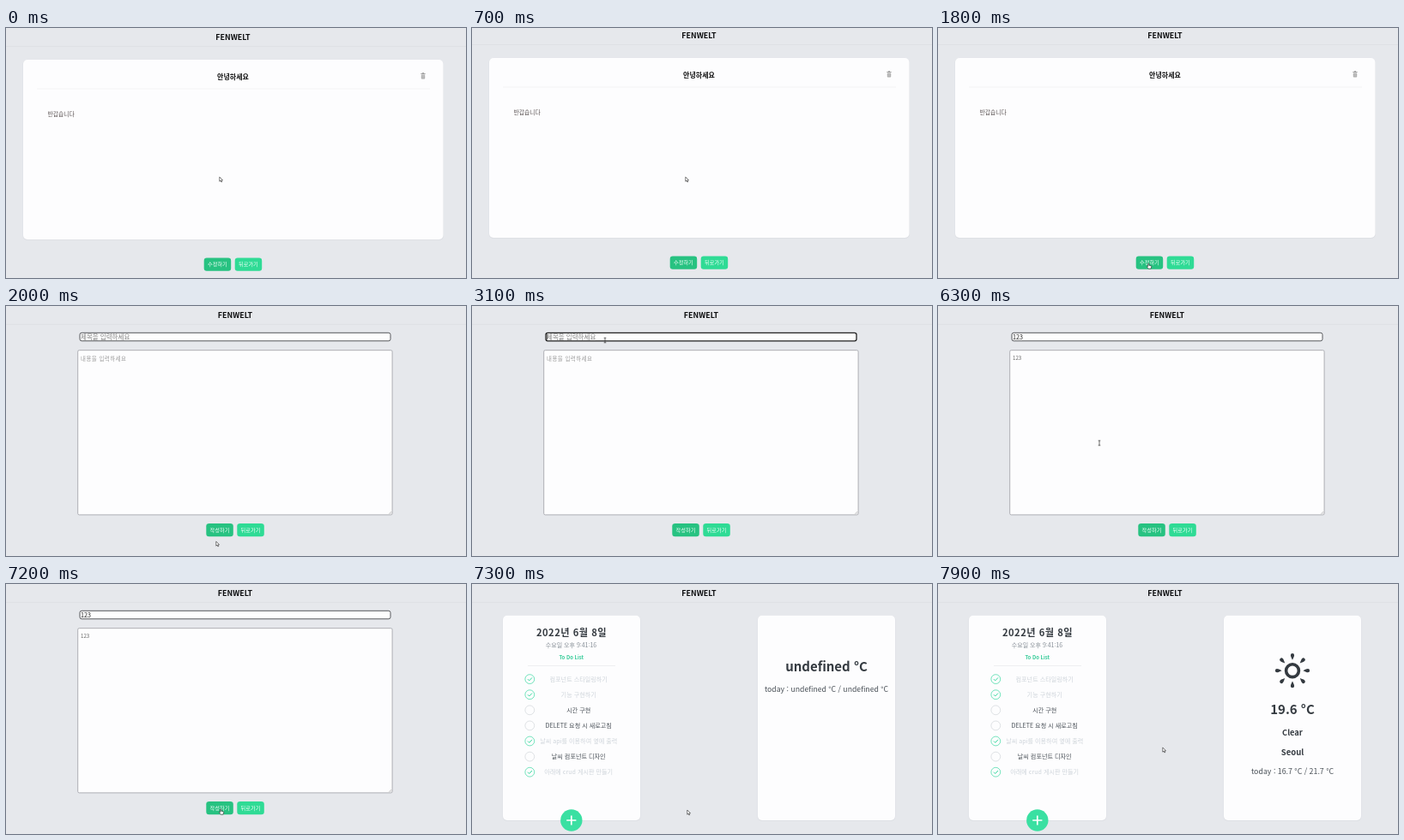
These frames come from a looping animation (536 px wide and 292 px high, 8000 ms). An HTML page:

```html
<!DOCTYPE html>
<html lang="ko">
<head>
<meta charset="utf-8">
<style>
html, body { margin: 0; width: 100%; height: 100%; overflow: hidden; background: #e6e8ec; }
svg { display: block; width: 536px; height: 292px; font-family: "Noto Sans CJK KR", "Noto Sans", sans-serif; }
</style>
</head>
<body>
<svg id="stage" viewBox="0 0 536 292"></svg>
<script>
const LOOP = 8000;
const stage = document.getElementById('stage');

function add(parent, tag, attrs = {}) {
  const el = document.createElementNS('http://www.w3.org/2000/svg', tag);
  for (const key in attrs) el.setAttribute(key, attrs[key]);
  return parent.appendChild(el);
}
const group = parent => add(parent, 'g');
const show = (el, on) => el.setAttribute('visibility', on ? 'inherit' : 'hidden');

// y is the vertical middle of the glyphs
function label(parent, text, x, y, size, fill, attrs = {}) {
  const el = add(parent, 'text', {
    x, y: y + size * 0.36, 'font-size': size, fill, 'text-anchor': 'middle', ...attrs
  });
  el.textContent = text;
  return el;
}
const bold = { 'font-weight': 700 };
const left = { 'text-anchor': 'start' };

function box(parent, x, y, width, height, rx, fill, attrs = {}) {
  return add(parent, 'rect', { x, y, width, height, rx, fill, ...attrs });
}
function path(parent, d, attrs) {
  return add(parent, 'path', { d, fill: 'none', ...attrs });
}
function header(parent, x) {
  label(parent, 'FENWELT', x, 11, 8.9, '#0c0d0f', bold);
  box(parent, 0, 21, 536, 1, 0, '#dfe1e5');
}
function card(parent, x, y, w, h) {
  box(parent, x - 0.5, y - 0.2, w + 1, h + 1.2, 5.5, '#dee0e5');
  box(parent, x, y, w, h, 5, '#fdfdfe');
}
function buttons(parent, x, y, first) {
  [[first, '#27c281'], ['뒤로가기', '#2fdb95']].forEach(([text, fill], i) => {
    box(parent, x + i * 36, y, 31.5, 15.3, 3.2, fill);
    label(parent, text, x + i * 36 + 15.7, y + 7.7, 6.2, '#f4fffa');
  });
}

// Post page
const post = group(stage);
header(post, 264.5);
card(post, 20, 37, 489.5, 210);
label(post, '안녕하세요', 264.5, 57, 8, '#111', bold);
box(post, 36, 70.5, 458, 1, 0, '#f3f3f5');
label(post, '반갑습니다', 48.5, 101, 6.8, '#5a5252', left);
path(post, 'M483.3 53.5h5.4M485 52.6h2', { stroke: '#999', 'stroke-width': 0.9 });
box(post, 483.8, 54.4, 4.4, 5, 0.7, '#aaa');
path(post, 'M485.2 55.2v3.4M486.8 55.2v3.4', { stroke: '#e4e4e4', 'stroke-width': 0.5 });
buttons(post, 230.7, 268.5, '수정하기');

// Edit page
const edit = group(stage);
header(edit, 267);
const titleBox = box(edit, 86, 31.3, 362, 9.5, 2.2, '#fefefe');
const titleHint = label(edit, '제목을 입력하세요', 87, 36, 7.5, '#808080', left);
const titleText = label(edit, '', 87, 36, 7.2, '#222', left);
const caret = box(edit, 0, 32.5, 0.7, 7, 0, '#222');
box(edit, 83.7, 51.7, 366.4, 192.2, 1.6, '#fdfdfe', { stroke: '#a6a8ad', 'stroke-width': 0.9 });
path(edit, 'M446.4 242.8l2.7-2.7M448 242.8l1.1-1.1', { stroke: '#888', 'stroke-width': 0.5 });
const bodyHint = label(edit, '내용을 입력하세요', 87, 61.2, 6.4, '#999', { ...left, 'letter-spacing': 0.5 });
const bodyText = label(edit, '', 87, 61.2, 6.2, '#666', left);
buttons(edit, 233.3, 254, '작성하기');

// Home page
const home = group(stage);
header(home, 264.5);
card(home, 36, 36.8, 160, 239.2);
card(home, 333, 36.8, 160, 239.2);
label(home, '2022년 6월 8일', 116, 57, 11.2, '#343a40', { ...bold, 'letter-spacing': 0.5 });
label(home, '수요일 오후 9:41:16', 115.5, 71.5, 7, '#868e96');
label(home, 'To Do List', 115.7, 86, 5.9, '#35cb98', bold);
box(home, 65, 95, 102, 1, 0, '#eeeff1');
[
  ['컴포넌트 스타일링하기', 1],
  ['기능 구현하기', 1],
  ['시간 구현', 0],
  ['DELETE 요청 시 새로고침', 0],
  ['날씨 api를 이용하여 옆에 출력', 1],
  ['날씨 컴포넌트 디자인', 0],
  ['아래에 crud 게시판 만들기', 1]
].forEach(([text, done], i) => {
  const y = 111.1 + i * 18.1;
  add(home, 'circle', {
    cx: 67.3, cy: y, r: 5.4, fill: 'none',
    stroke: done ? '#4fdcab' : '#d6dade', 'stroke-width': 0.8
  });
  if (done) path(home, `M64.9 ${y}l1.8 1.8 3.3-3.5`, { stroke: '#38d9a0', 'stroke-width': 1 });
  label(home, text, 124.2, y, 7.1, done ? '#ced4da' : '#495057');
});
add(home, 'circle', { cx: 115.8, cy: 276, r: 12.7, fill: '#3ae0a2' });
path(home, 'M110.2 276h11.2M115.8 270.4v11.2', { stroke: '#fff', 'stroke-width': 1.7 });

const loading = group(home);
label(loading, 'undefined °C', 413, 97, 15, '#343a40', bold);
label(loading, 'today : undefined °C / undefined °C', 413, 122.5, 8.7, '#495057');

const weather = group(home);
add(weather, 'circle', { cx: 413, cy: 101.2, r: 7.4, fill: 'none', stroke: '#343a40', 'stroke-width': 3.6 });
for (let a = 0; a < 360; a += 45) {
  path(weather, 'M413 88.8C411.8 86.2 410.9 84.4 410.9 83.2A2.1 2.1 0 0 1 415.1 83.2C415.1 84.4 414.2 86.2 413 88.8Z',
    { fill: '#343a40', transform: `rotate(${a} 413 101.2)` });
}
label(weather, '19.6 °C', 413, 147, 15, '#343a40', bold);
label(weather, 'Clear', 413, 173.5, 9.3, '#343a40', bold);
label(weather, 'Seoul', 413, 197, 9.5, '#343a40', bold);
label(weather, 'today : 16.7 °C / 21.7 °C', 413, 219.3, 8.8, '#495057');

// Pointer shapes, centred on the origin
const pointer = group(stage);
const outline = { stroke: '#222', 'stroke-width': 0.6, fill: '#fff', 'stroke-linejoin': 'round' };
const arrow = path(pointer, 'M-1.2-3V2.2L0 1.1 .9 3 1.7 2.6 .9.8 2.5.7Z', outline);
const hand = path(pointer, 'M-1.2.4V-2.8Q-.7-3.5-.2-2.8V-.8L2.3-.2Q2.8 0 2.7.9L2.1 3.2H-.8L-2.7.7Q-2.4-.2-1.2.4Z', outline);
const beam = path(pointer, 'M-1.3-2.8H1.3M-1.3 2.8H1.3M0-2.8V2.8', { stroke: '#444', 'stroke-width': 0.8 });

// time, x, y
const route = [
  [0, 250, 177], [1000, 250, 177], [1600, 246, 278], [2100, 246, 278], [2900, 155, 40],
  [4500, 155, 40], [5000, 150, 78], [5300, 152, 84], [5600, 152, 84], [6300, 188, 160],
  [6900, 250, 265], [7200, 251, 266], [7300, 252, 267], [7800, 263, 194], [LOOP, 263, 194]
];
function pointerAt(t) {
  const i = route.findIndex(p => p[0] > t);
  const [t0, x0, y0] = route[i - 1], [t1, x1, y1] = route[i];
  const k = (t - t0) / (t1 - t0), e = k * k * (3 - 2 * k);
  return [x0 + (x1 - x0) * e, y0 + (y1 - y0) * e];
}
const typed = (t, start, gap) => '123'.slice(0, Math.max(0, Math.floor((t - start) / gap) + 1));

function draw(t) {
  const page = t < 2000 ? post : t < 7300 ? edit : home;
  for (const p of [post, edit, home]) show(p, p === page);
  post.setAttribute('transform', `translate(0 ${t < 500 ? 0 : -2})`);

  const title = typed(t, 4000, 200), body = typed(t, 5700, 150);
  const focused = t >= 3000 && t < 5300;
  titleText.textContent = title;
  bodyText.textContent = body;
  show(titleHint, page === edit && !title);
  show(bodyHint, page === edit && !body);
  titleBox.setAttribute('stroke', focused ? '#222' : '#55575b');
  titleBox.setAttribute('stroke-width', focused ? 1.3 : 1);
  caret.setAttribute('x', 87.2 + title.length * 4);
  show(caret, page === edit && focused && t % 1000 < 500);

  show(loading, page === home && t < 7600);
  show(weather, page === home && t >= 7600);

  const [x, y] = pointerAt(t);
  pointer.setAttribute('transform', `translate(${x} ${y})`);
  const onButton = page === post ? y > 266 : page === edit && y > 254 && y < 270;
  const onField = page === edit && x > 84 && x < 450 && (y < 41 && y > 31 || y > 51 && y < 244);
  show(hand, onButton);
  show(beam, onField);
  show(arrow, !onButton && !onField);
}

const start = performance.now();
function tick() {
  draw((performance.now() - start) % LOOP);
  requestAnimationFrame(tick);
}
tick();
</script>
</body>
</html>
```
